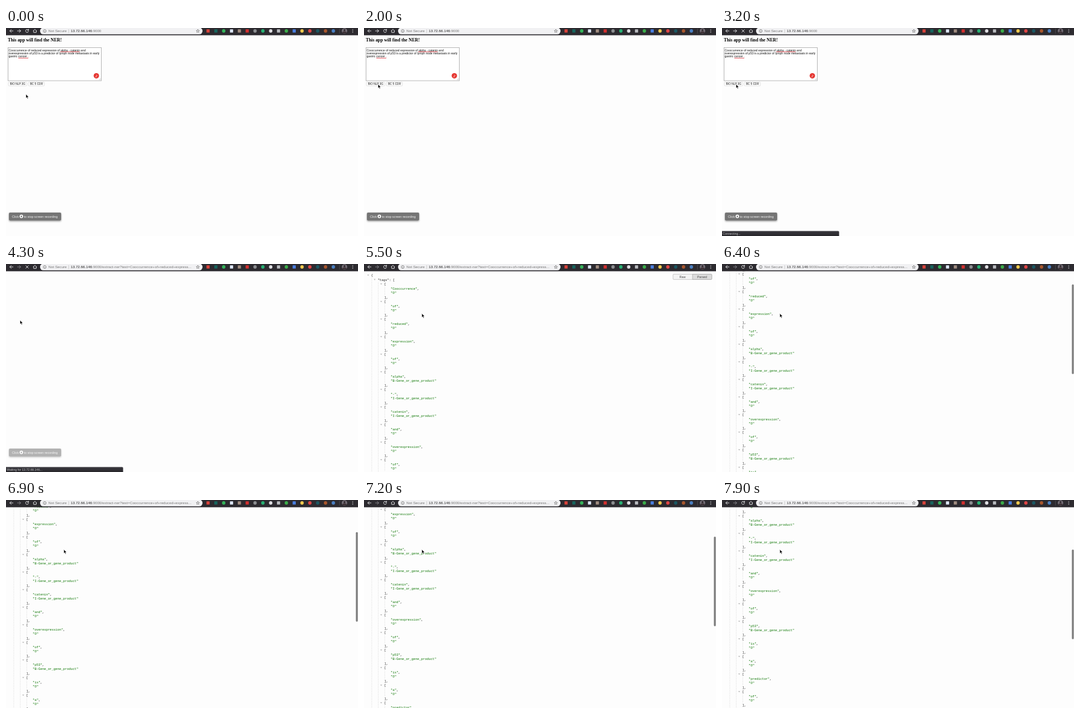
An HTML page for the animation above (8 s loop, 600x355 px).

```html
<!DOCTYPE html>
<html lang="en">
<head>
<meta charset="utf-8">
<title>NER demo</title>
<style>
  html, body { margin: 0; width: 100%; height: 100%; overflow: hidden; background: #fdfdfd; }
  svg { display: block; width: 100vw; height: 100vh; }
  text { font-family: "Liberation Sans", Arial, sans-serif; white-space: pre; }
  .mono { font-family: "Liberation Mono", "Courier New", monospace; font-size: 5.4px; fill: #222; }
  .mono.str { fill: #0b7500; }
  .title { font: bold 7.8px "Liberation Serif", Times, serif; }
  .url { font-size: 6.25px; fill: #777; }
  .line { fill: none; stroke-linecap: round; stroke-linejoin: round; }
</style>
</head>
<body>
<svg viewBox="0 0 600 355" preserveAspectRatio="none">
  <defs>
    <filter id="blur" x="-20%" y="-60%" width="140%" height="220%"><feGaussianBlur stdDeviation="1.6"/></filter>
    <linearGradient id="bar" x1="0" y1="0" x2="0" y2="1">
      <stop offset="0" stop-color="#3b3a40"/><stop offset="1" stop-color="#28272b"/>
    </linearGradient>
    <clipPath id="face"><circle cx="577" cy="5" r="4.6"/></clipPath>
  </defs>
  <rect width="600" height="355" fill="#fdfdfd"/>

  <g id="form">
    <text class="title" x="3" y="23.2">This app will find the NER!</text>
    <rect x="3.5" y="33.5" width="159" height="56.5" fill="#fff" stroke="#a5a5a5" stroke-width=".8"/>
    <g font-size="5" fill="#111">
      <text x="4.5" y="39.6">Cooccurrence of reduced expression of alpha - catenin and</text>
      <text x="4.5" y="45">overexpression of p53 is a predictor of lymph node metastasis in early</text>
      <text x="4.5" y="50.4">gastric cancer .</text>
    </g>
    <path d="M92.5 40.6H125.5M21 51.4H38" stroke="#e0454a" stroke-width=".9"/>
    <circle cx="154" cy="81.6" r="4.6" fill="#e5342f"/>
    <text x="154" y="83.8" font-size="6" font-style="italic" fill="#fff" text-anchor="middle">2</text>
    <path d="M158.4 89L161.6 85.8M160.2 89L161.6 87.6" stroke="#999" stroke-width=".5"/>
    <g fill="#fff" stroke="#cfcfcf" stroke-width=".6">
      <rect x="4" y="92.4" width="31.4" height="6.4" rx="1.2"/>
      <rect x="38" y="92.4" width="27.6" height="6.4" rx="1.2"/>
    </g>
    <g font-size="4.7" fill="#111" text-anchor="middle">
      <text x="19.8" y="97.2">BIO NLP 3G</text>
      <text x="51.9" y="97.2">BC 5 CDR</text>
    </g>
  </g>

  <g id="json">
    <g id="tree"></g>
    <rect x="526.8" y="17.4" width="66" height="9" rx="1.2" fill="#f4f4f4" stroke="#aaa" stroke-width=".6"/>
    <path d="M560 17.4H591.6Q592.8 17.4 592.8 18.6V25.2Q592.8 26.4 591.6 26.4H560Z" fill="#dcdcdc" stroke="#999" stroke-width=".6"/>
    <g font-size="5.2" fill="#444" text-anchor="middle">
      <text x="543" y="23.8">Raw</text><text x="576.3" y="23.8">Parsed</text>
    </g>
  </g>
  <rect id="thumb" x="596.4" width="3.2" height="153" rx="1.6" fill="#7c7c7c"/>

  <g id="pill">
    <rect x="5" y="316" width="89" height="14" rx="2" fill="#000" opacity=".38" filter="url(#blur)"/>
    <rect x="5" y="315" width="89" height="13.6" rx="2" fill="#757575"/>
    <g font-size="5.35" fill="#f5f5f5">
      <text x="10.3" y="323.5">Click</text><text x="30.6" y="323.5">to stop screen recording</text>
    </g>
    <circle cx="26.2" cy="321.6" r="3" fill="#fff"/>
    <rect x="25.1" y="320.5" width="2.2" height="2.2" rx=".4" fill="#666"/>
  </g>

  <g id="status">
    <path d="M0 346.4H198Q199.6 346.4 199.6 348V355H0Z" fill="url(#bar)"/>
    <text id="statusText" x="1.2" y="352.7" font-size="5.2" fill="#bdbdc0"></text>
  </g>

  <g id="toolbar">
    <rect width="600" height="12.4" fill="#2d2b30"/>
    <g class="line" stroke="#e8e8ea" stroke-width=".9">
      <path d="M12 5H6.6M9 2.5L6.5 5L9 7.5"/>
      <path id="forward" d="M19.6 5H25M22.6 2.5L25.1 5L22.6 7.5"/>
      <path id="reload" d="M38.1 3.4A2.6 2.6 0 1 0 38.5 5.7M38.5 2V4H36.5"/>
      <path id="stop" d="M33.8 2.8L38.2 7.2M38.2 2.8L33.8 7.2"/>
      <path d="M46.3 5L49.3 2.2L52.3 5M47.1 4.6V7.7H51.5V4.6"/>
    </g>
    <rect x="58" y="-.6" width="277" height="11.4" rx="5.7" fill="#f1f1f3"/>
    <circle cx="66" cy="5.1" r="2.5" fill="none" stroke="#666" stroke-width=".7"/>
    <path d="M66 4.8V6.6M66 3.4V4" stroke="#666" stroke-width=".7"/>
    <text class="url" x="72.2" y="7.3" fill="#666">Not Secure</text>
    <path d="M106.8 2V8.6" stroke="#aaa" stroke-width=".5"/>
    <text class="url" x="110.2" y="7.3"><tspan fill="#222">13.72.66.146</tspan><tspan id="path"></tspan></text>
    <path id="star" fill="none" stroke="#555" stroke-width=".6"/>
    <g id="icons"></g>
    <path d="M568.4 1V9.4" stroke="#5a585e" stroke-width=".6"/>
    <g clip-path="url(#face)">
      <rect x="572" width="10" height="10" fill="#77717a"/>
      <circle cx="577" cy="3.6" r="1.8" fill="#322b30"/>
      <ellipse cx="577" cy="9.4" rx="4" ry="3.8" fill="#3f3338"/>
    </g>
    <g fill="#e8e8ea"><circle cx="591" cy="2.6" r=".65"/><circle cx="591" cy="5" r=".65"/><circle cx="591" cy="7.4" r=".65"/></g>
  </g>

  <path id="cursor" d="M0 0V6.6L1.5 5.3L2.6 7.8L3.7 7.3L2.6 4.9H4.7Z" fill="#000" stroke="#fff" stroke-width=".5"/>
</svg>

<script>
const LOOP = 8000, STEP = 100;
const $ = id => document.getElementById(id);

function add(parent, tag, attrs, text) {
  const el = document.createElementNS("http://www.w3.org/2000/svg", tag);
  for (const key in attrs) el.setAttribute(key, attrs[key]);
  if (text) el.textContent = text;
  parent.appendChild(el);
  return el;
}

function buildIcons() {
  // colour and shape: c circle, s square
  const icons = ["#d8433b s", "#17655d s", "#35b35a c", "#dce6f5 s", "#a08c80 s", "#d3302f s",
    "#8b8d90 c", "#27b073 c", "#dedee2 c", "#b9bbbf s", "#3bac49 c", "#4a7fe0 s", "#f2c94e c",
    "#df4545 c", "#1b5762 c", "#a8562c c", "#4a7fc2 c"];
  icons.forEach((icon, i) => {
    const [fill, shape] = icon.split(" "), x = 344.4 + i * 13.35;
    if (shape === "c") add($("icons"), "circle", { cx: x, cy: 5, r: 2.9, fill });
    else add($("icons"), "rect", { x: x - 2.7, y: 2.2, width: 5.4, height: 5.6, rx: .5, fill });
  });
  const points = Array.from({ length: 10 }, (_, i) => {
    const a = i * Math.PI / 5 - Math.PI / 2, r = i % 2 ? 1.3 : 2.9;
    return (327 + r * Math.cos(a)).toFixed(2) + " " + (5.2 + r * Math.sin(a)).toFixed(2);
  });
  $("star").setAttribute("d", "M" + points.join("L") + "Z");
}

function buildTree() {
  const ROW = 7.5, TOP = 19.5, INDENT = 11.1, tree = $("tree");
  const words = ("Cooccurrence of reduced expression of alpha - catenin and overexpression of p53 is a " +
    "predictor of lymph node metastasis in early gastric cancer .").split(" ");
  const tags = { alpha: "B", "-": "I", catenin: "I", p53: "B" };
  let row = 0;

  function put(depth, text, kind) {
    const x = 12.2 + depth * INDENT, y = TOP + row++ * ROW;
    add(tree, "text", { class: kind === "str" ? "mono str" : "mono", x, y: y + 1.8 }, text);
    if (kind === "open") add(tree, "path", { d: `M${x - 6.6} ${y - 1.6}h3l-1.5 2.6z`, fill: "#bdbdbd" });
  }
  function guide(depth, from, to) {
    const x = 13.2 + depth * INDENT;
    add(tree, "path", {
      d: `M${x} ${TOP + from * ROW - 3.7}V${TOP + to * ROW - 3.7}`,
      stroke: "#d2d2d2", "stroke-width": .6, "stroke-dasharray": ".7 .6"
    });
  }

  put(0, "{", "open");
  put(1, '"tags": [', "open");
  words.forEach((word, i) => {
    const tag = tags[word] ? tags[word] + "-Gene_or_gene_product" : "O";
    put(2, "[", "open");
    guide(2, row, row + 2);
    put(3, `"${word}",`, "str");
    put(3, `"${tag}"`, "str");
    put(2, i < words.length - 1 ? "]," : "]");
  });
  guide(1, 2, row);
  put(1, "]");
  guide(0, 1, row);
  put(0, "}");
  // commas stay dark
  tree.querySelectorAll(".str").forEach(el => {
    if (!el.textContent.endsWith(",")) return;
    el.textContent = el.textContent.slice(0, -1);
    add(el, "tspan", { fill: "#222" }, ",");
  });
}

// keys: [time, value, power of the ease-out towards this key]
function track(keys, t) {
  const i = keys.findIndex(k => k[0] > t);
  if (i < 0) return keys[keys.length - 1][1];
  if (i === 0) return keys[0][1];
  const [t0, a] = keys[i - 1], [t1, b, power = 1] = keys[i];
  return a + (b - a) * (1 - Math.pow(1 - (t - t0) / (t1 - t0), power));
}

const cursorX = [[0, 34], [700, 24, 1.4], [4700, 24], [5100, 98.6, 1.4]];
const cursorY = [[0, 113], [700, 96, 1.4], [4700, 96], [5100, 84.4, 1.4]];
const scrollY = [[5600, 0], [6400, 47], [7200, 108, 1.3], [7500, 108], [7900, 157, 1.2]];
const pillFade = [[4200, 1], [4300, .55], [4600, 0]];
const statusFade = [[2900, .4], [3200, 1], [4700, 1], [5000, 0]];

const show = (id, on) => $(id).setAttribute("visibility", on ? "visible" : "hidden");
const fade = (id, value) => $(id).setAttribute("opacity", value);
const move = (id, x, y) => $(id).setAttribute("transform", `translate(${x} ${y})`);

function draw(t) {
  const loading = t >= 2900 && t < 4800, committed = t >= 4000;
  const offset = track(scrollY, t);

  show("form", t < 4300);
  show("json", t >= 5500);
  move("json", 0, -offset);
  show("thumb", t >= 5700);
  $("thumb").setAttribute("y", 13.5 + offset * .453);
  fade("pill", track(pillFade, t));

  fade("status", t < 2900 ? 0 : track(statusFade, t));
  $("statusText").textContent = t < 3600 ? "Connecting..." : "Waiting for 13.72.66.146...";

  show("reload", !loading);
  show("stop", loading);
  $("forward").setAttribute("stroke", committed ? "#8b898f" : "#e8e8ea");
  $("path").textContent = committed
    ? ":9000/extract-ner?text=Cooccurrence+of+reduced+express..." : ":9000";

  move("cursor", track(cursorX, t), track(cursorY, t));
}

buildIcons();
buildTree();
const start = performance.now();
function tick() {
  const t = (performance.now() - start) % LOOP;
  draw(Math.floor(t / STEP) * STEP);
  requestAnimationFrame(tick);
}
tick();
</script>
</body>
</html>
```
